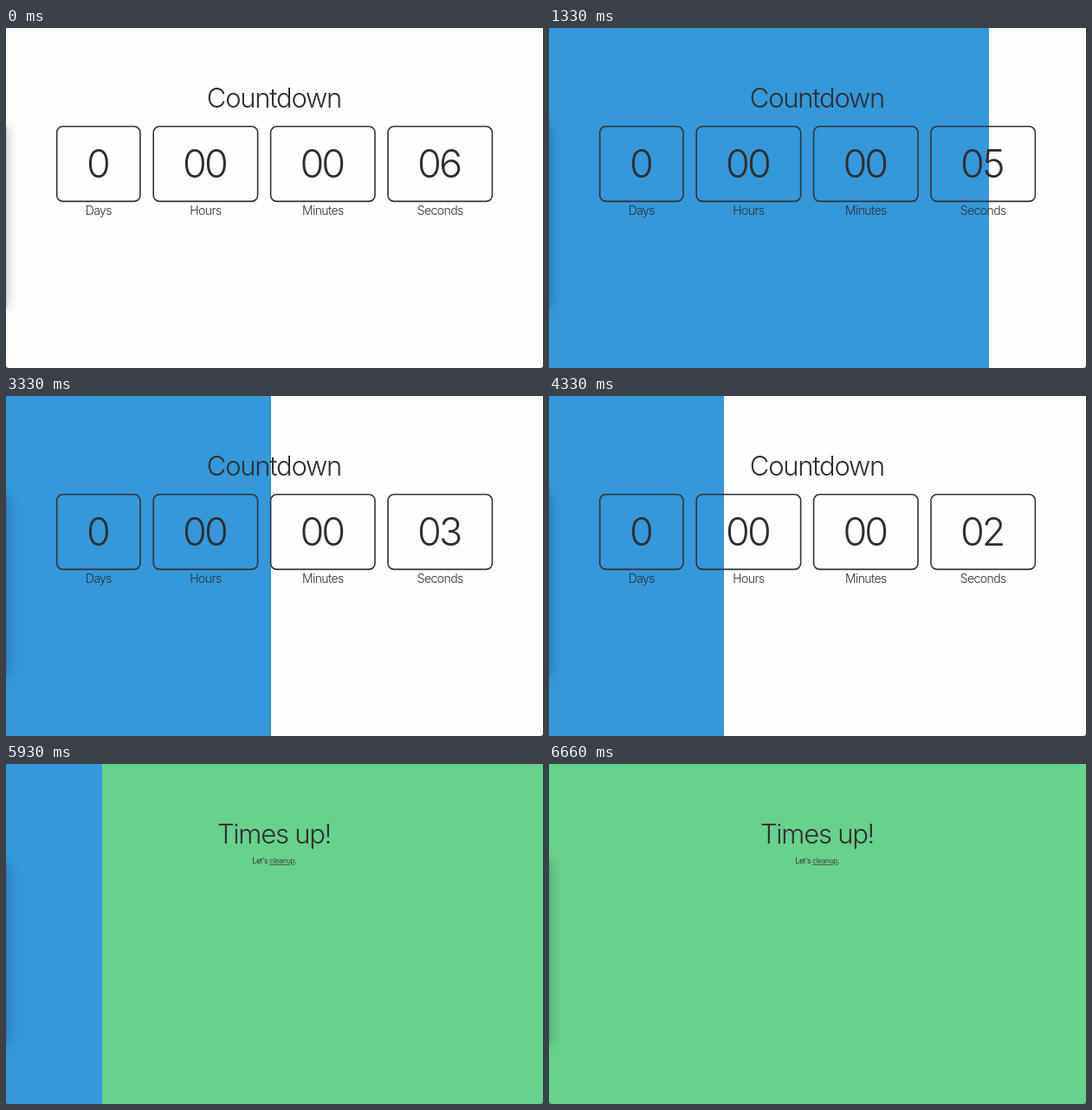
These frames come from a looping animation (620x393 px, 7.06 s). An HTML page:

```html
<!DOCTYPE html>
<html lang="en">
<head>
<meta charset="utf-8">
<title>Countdown</title>
<style>
  html, body { margin: 0; width: 100%; height: 100%; overflow: hidden; background: #333; }
  #stage { position: relative; width: 620px; height: 393px; overflow: hidden; border-radius: 0 0 3px 3px; background: #fefefd; }
  #stage.done { background: #67d18e; }
  #bar { position: absolute; left: 0; top: 0; height: 100%; background: #3498db; }
  #panel { position: absolute; left: -30px; top: 114px; width: 31px; height: 209px;
    background: rgba(50, 50, 130, .28); box-shadow: 0 0 14px rgba(0, 0, 0, .28); }
  svg { position: absolute; left: 0; top: 0; }
  text { font: 300 14px Inter, "Liberation Sans", sans-serif; letter-spacing: -.04em; text-anchor: middle; fill: #2e2e30; }
  .title { font-size: 31px; }
  .digits { font-size: 45px; letter-spacing: 0; }
  .note { font-size: 8.4px; font-weight: 400; }
  .link { text-decoration: underline; fill: #444; }
  rect { fill: none; stroke: #333336; stroke-width: 1.6; }
  .done #clock, #stage:not(.done) #finish { display: none; }
</style>
</head>
<body>
<div id="stage">
  <div id="bar"></div>
  <div id="panel"></div>
  <svg width="620" height="393">
    <g id="clock"><text class="title" x="309.5" y="91.5">Countdown</text></g>
    <g id="finish">
      <text class="title" x="309.5" y="91.5">Times up!</text>
      <text class="note" x="310" y="115">Let's <tspan class="link">cleanup</tspan>.</text>
    </g>
  </svg>
</div>
<script>
const LOOP = 7060, FPS = 15, TICKS = [1000, 2000, 3000, 3930, 4930, 5930];
const FADE_START = 6420, FADE_TIME = 220;
// Bar moves: start, duration, width reached
const MOVES = [[0, 260, 7], [990, 340, 508], [2040, 350, 404], [2990, 340, 306],
               [3970, 350, 202], [4970, 350, 98], [5925, 348, 620]];
const $ = id => document.getElementById(id);
const clamp = v => Math.max(0, Math.min(1, v));

function addCard(label, digits, center) {
  const width = 72 + 24.2 * digits.length;
  const xs = digits.length > 1 ? `${center - 12.4} ${center + 12.4}` : center;
  $('clock').insertAdjacentHTML('beforeend',
    `<rect x="${center - width / 2}" y="113.8" width="${width}" height="86.6" rx="7"/>
     <text class="digits" x="${xs}" y="173">${digits}</text>
     <text x="${center}" y="216">${label}</text>`);
}
addCard('Days', '0', 106.8);
['Hours', 'Minutes', 'Seconds'].forEach((label, i) => addCard(label, '00', 230.4 + 135.4 * i));
const seconds = [...document.querySelectorAll('.digits')].pop();

function barWidth(t) {
  let width = 0;
  for (const [start, time, target] of MOVES) width += (target - width) * clamp((t - start) / time);
  return width;
}

function draw(now) {
  const step = Math.floor((now % LOOP + 7) * FPS / 1000);
  const t = step * 1000 / FPS;
  const left = TICKS.filter(tick => t < tick).length;
  $('stage').classList.toggle('done', left === 0);
  seconds.textContent = '0' + left;
  $('bar').style.width = barWidth(t) + 'px';
  $('bar').style.opacity = 1 - clamp((t - FADE_START) / FADE_TIME);
  requestAnimationFrame(draw);
}
draw(performance.now());
</script>
</body>
</html>
```
